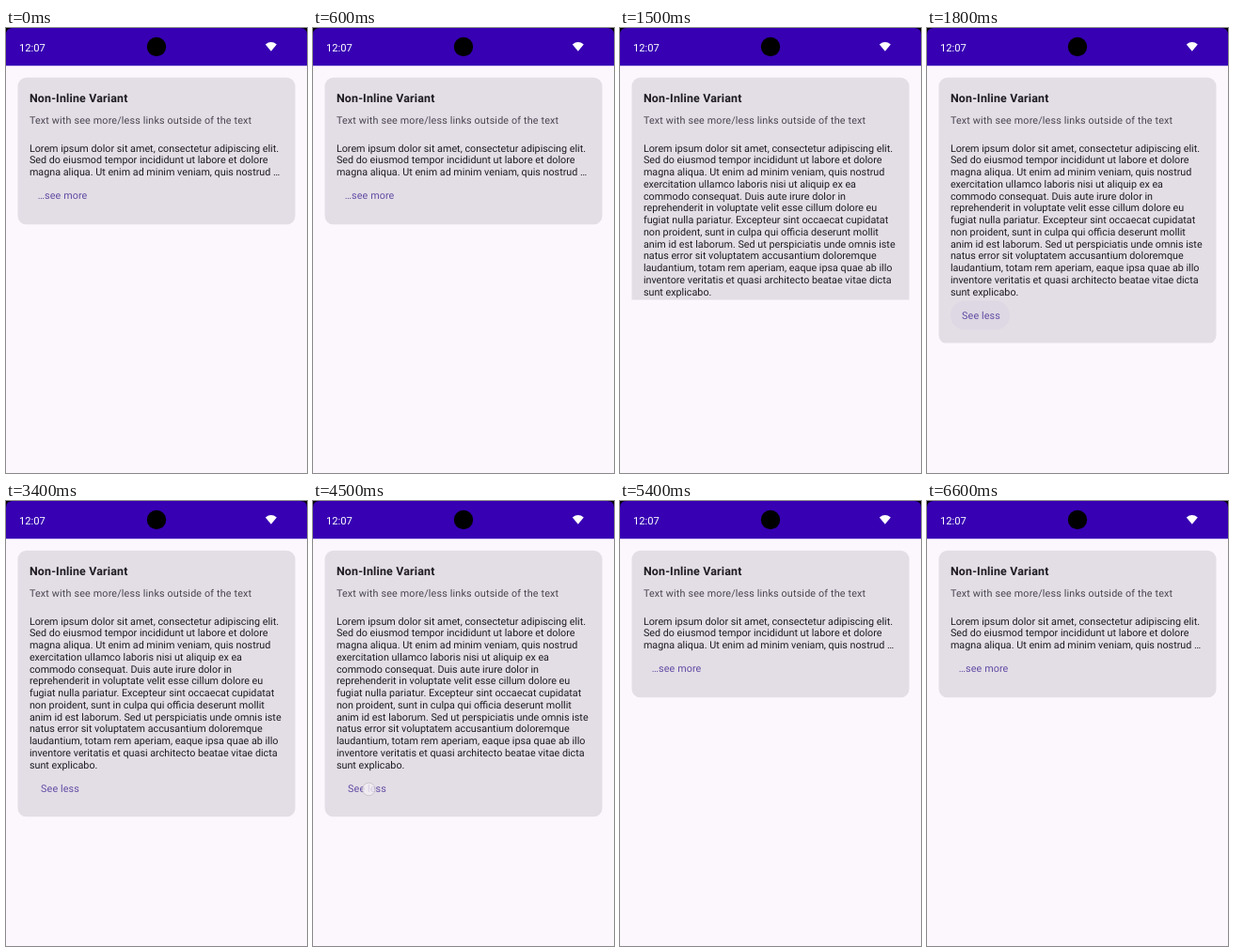
Animation, 320 px wide and 474 px high, one loop 6700 ms. Source, as an HTML page:

```html
<!DOCTYPE html>
<html lang="en">
<head>
<meta charset="utf-8">
<title>Expandable text card</title>
<style>
  html, body { margin: 0; width: 100%; height: 100%; overflow: hidden; background: #fcf6fd; }
  svg { display: block; width: 320px; height: 474px; }
  text { font: 400 10.77px Roboto, sans-serif; fill: #1d1b20; text-rendering: geometricPrecision; white-space: pre; }
  .time { font-size: 11.2px; fill: #fff; }
  .title { font-size: 12.4px; font-weight: 700; letter-spacing: .18px; }
  .sub { fill: #49454f; letter-spacing: .16px; }
  .link { fill: #624ba3; letter-spacing: .1px; }
</style>
</head>
<body>
<svg viewBox="0 0 320 474">
  <defs>
    <clipPath id="outerClip"><rect id="outer" width="320" height="209.5"/></clipPath>
    <clipPath id="innerClip"><rect id="inner" width="320" height="197"/></clipPath>
  </defs>
  <rect width="320" height="474" fill="#fcf6fd"/>

  <rect width="320" height="40.2" fill="#3700b3"/>
  <path d="M0 0H7Q0 0 0 7ZM320 0H313Q320 0 320 7Z"/>
  <text class="time" x="13.9" y="25">12:07</text>
  <circle cx="160" cy="20" r="10.2"/>
  <path d="M275.8 17.4Q281.8 12.8 287.8 17.4L281.8 24.8Z" fill="#fff"/>

  <g clip-path="url(#outerClip)">
    <rect id="card" x="12.5" y="52.8" width="295" height="156.7" rx="9.4" fill="#e3dee6"/>
    <g clip-path="url(#innerClip)">
      <text class="title" x="24.9" y="79">Non-Inline Variant</text>
      <text class="sub" x="24.9" y="102">Text with see more/less links outside of the text</text>
      <g id="short">
        <text class="link" x="33.8" y="182.4">…see more</text>
      </g>
      <g id="full">
        <rect id="ripple" x="25" y="290.5" width="63" height="31" rx="15.5" fill="#6750a4" opacity="0"/>
        <text class="link" x="37.1" y="309.9">See less</text>
      </g>
    </g>
  </g>
  <circle id="touch" r="6.8" fill="#f1edf3" fill-opacity=".8" stroke="#aaa5b0" stroke-opacity=".6" stroke-width=".8"/>
</svg>
<script>
const LOOP = 6700, OPEN = 1284, CLOSE = 4550;
const LOW = 209.5, HIGH = 336.5, PAD = 12.4, STIFF = 0.02;
const LINES = [
  'Lorem ipsum dolor sit amet, consectetur adipiscing elit.',
  'Sed do eiusmod tempor incididunt ut labore et dolore',
  'magna aliqua. Ut enim ad minim veniam, quis nostrud',
  'exercitation ullamco laboris nisi ut aliquip ex ea',
  'commodo consequat. Duis aute irure dolor in',
  'reprehenderit in voluptate velit esse cillum dolore eu',
  'fugiat nulla pariatur. Excepteur sint occaecat cupidatat',
  'non proident, sunt in culpa qui officia deserunt mollit',
  'anim id est laborum. Sed ut perspiciatis unde omnis iste',
  'natus error sit voluptatem accusantium doloremque',
  'laudantium, totam rem aperiam, eaque ipsa quae ab illo',
  'inventore veritatis et quasi architecto beatae vitae dicta',
  'sunt explicabo.'
];
const TAPS = [
  { x: 67.5, y: 180, from: 1150, hold: 1220, end: 1420 },
  { x: 59.3, y: 307, from: 4450, hold: 4520, end: 4750 }
];

const el = id => document.getElementById(id);
const set = (id, attrs) => { for (const k in attrs) el(id).setAttribute(k, attrs[k]); };
const fade = (t, a, b) => Math.min(1, Math.max(0, (b - t) / (b - a)));

function addLines(id, lines) {
  lines.forEach((line, i) => {
    const text = document.createElementNS('http://www.w3.org/2000/svg', 'text');
    text.setAttribute('x', 24.9);
    text.setAttribute('y', 131.55 + i * 12.75);
    text.textContent = line;
    el(id).append(text);
  });
}

// Critically damped spring; the chased version follows another such spring.
function spring(ms, chased) {
  const x = Math.max(0, ms) * STIFF;
  const sum = 1 + x + (chased ? x * x / 2 + x * x * x / 6 : 0);
  return 1 - Math.exp(-x) * sum;
}

function render(t) {
  const open = t >= OPEN && t < CLOSE;
  const bottom = chased => t < CLOSE
    ? LOW + (HIGH - LOW) * spring(t - OPEN, chased)
    : HIGH + (LOW - HIGH) * spring(t - CLOSE, chased);
  const inner = bottom(false);

  set('outer', { height: bottom(true) });
  set('inner', { height: inner - PAD });
  set('card', { height: inner - 52.8 });
  set('short', { visibility: open ? 'hidden' : 'visible' });
  set('full', { visibility: open ? 'visible' : 'hidden' });
  set('ripple', { opacity: open ? 0.06 * fade(t, 1750, 1980) : 0 });

  const tap = TAPS.find(p => t >= p.from && t < p.end);
  set('touch', tap
    ? { cx: tap.x, cy: tap.y, opacity: fade(t, tap.hold, tap.end) }
    : { opacity: 0 });
}

addLines('short', [LINES[0], LINES[1], LINES[2] + ' …']);
addLines('full', LINES);

const start = performance.now();
function tick() {
  render((performance.now() - start) % LOOP);
  requestAnimationFrame(tick);
}
tick();
</script>
</body>
</html>
```
